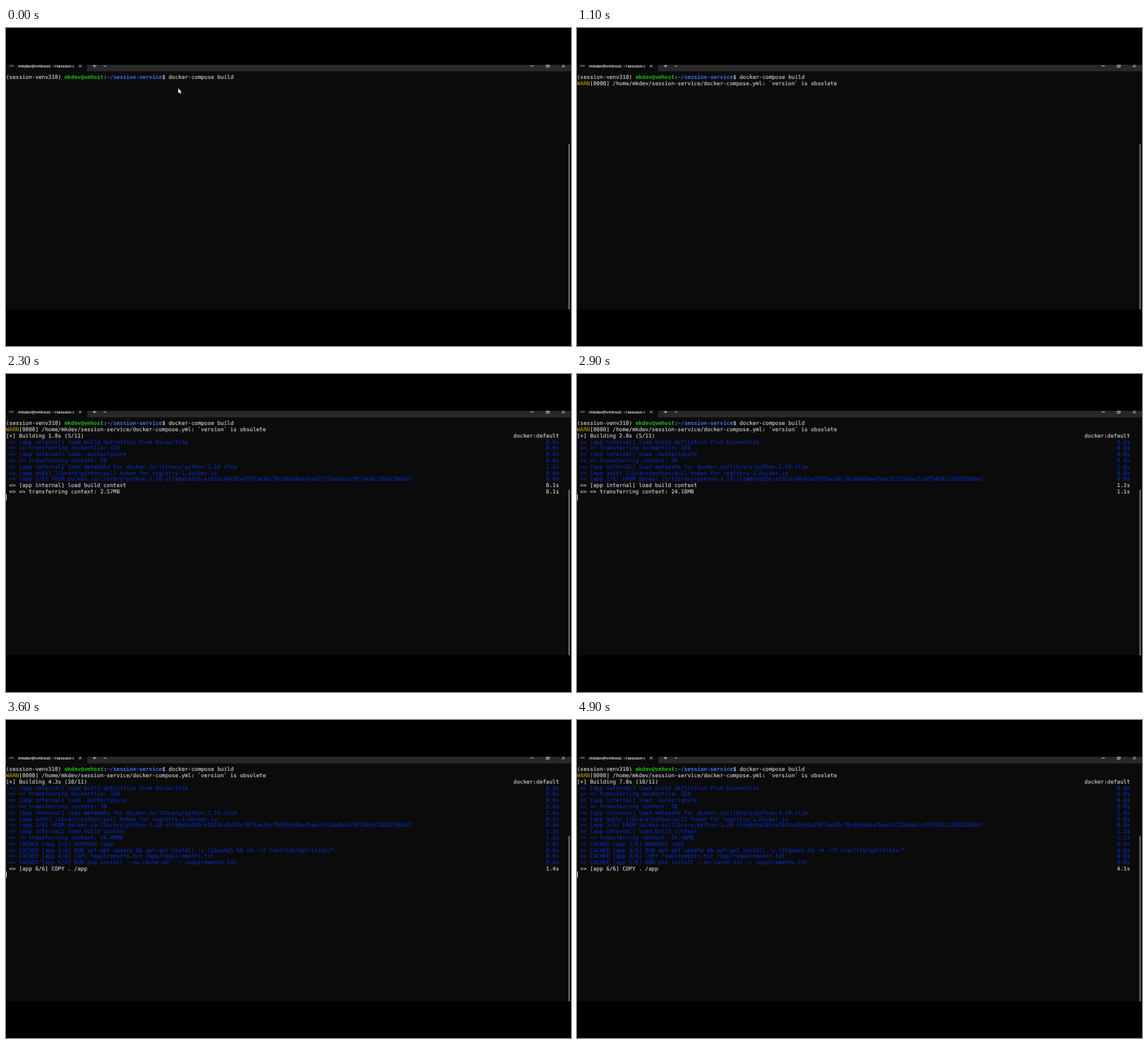
An HTML page that plays this animation: 800 px wide and 450 px high, repeating every 5000 ms.

```html
<!DOCTYPE html>
<html>
<head>
<meta charset="utf-8">
<style>
html, body { margin: 0; width: 100%; height: 100%; overflow: hidden; background: #000; }
svg { display: block; width: 800px; height: 450px; }
text { white-space: pre; text-rendering: geometricPrecision; }
#term text {
  font: 7.65px "DejaVu Sans Mono", monospace;
  stroke: currentColor; stroke-width: .12px; fill: currentColor;
}
#term .bold { font-weight: bold; stroke: none; }
.title { font: 600 5.9px "Open Sans", sans-serif; fill: #eee; }
.icons { fill: none; stroke: #ddd; stroke-width: .8; }
</style>
</head>
<body>
<svg viewBox="0 0 800 450">
  <defs>
    <clipPath id="bar"><rect y="52" width="800" height="9.5"/></clipPath>
    <clipPath id="tab"><rect y="51.5" width="96" height="10"/></clipPath>
  </defs>
  <rect y="52" width="800" height="346" fill="#0b0b0b"/>
  <rect x="115" y="52" width="685" height="9.3" fill="#282828"/>
  <g clip-path="url(#bar)">
    <rect x="4.5" y="50" width="6.5" height="5" fill="#444"/>
    <text class="title" x="17" y="56" clip-path="url(#tab)">mkdev@vmhost: ~/session-service</text>
    <path class="icons" d="M103 51.7l4 4m0-4l-4 4M122.8 53.7h5m-2.5-2.5v5M138.2 53l1.8 1.6 1.8-1.6
      M742.5 53.8h5M765 52.6h3.2v3h-3.2zM766.2 52.4v-.8h3v3h-.8M787 51.6l4.4 4.4m0-4.4l-4.4 4.4"/>
  </g>
  <rect x="796.6" y="164" width="1.5" height="234" fill="#8c8c8c"/>
  <g id="term"></g>
  <path id="mouse" fill="#fff" d="M244 85.3v7l1.6-1.4 1.1 2.3 1-.5-1-2.2h2z"/>
</svg>
<script>
const NS = "http://www.w3.org/2000/svg";
const term = document.getElementById("term"), mouse = document.getElementById("mouse");
const CELL = 4.6057, ROW = 8.79, TOP = 64.9, RIGHT = 783;
const WHITE = "#d2d2d2", BLUE = "#0a2dbb", GREEN = "#16bd0e", PATH = "#3b72ec", YELLOW = "#b59405";
const BASE = "docker.io/library/python:3.10-slim";
const HASH = "e1013c40c02a7875ae30c78c69b68ea7bee31713e8ac1c0f5469c1266258d6d7";
// loop time in ms, build clock in seconds
const CLOCK = [[1200, .1], [1400, .1], [1800, .7], [2300, 1.8], [2900, 2.8], [3600, 4.3], [4900, 7]];

function add(tag, attrs, content = "") {
  const el = document.createElementNS(NS, tag);
  for (const k in attrs) el.setAttribute(k, attrs[k]);
  el.textContent = content;
  term.append(el);
}

function put(row, col, str, color = WHITE, bold = false) {
  add("text", { x: col * CELL, y: TOP + 7.4 + row * ROW, color, class: bold ? "bold" : "" }, str);
}

function putRight(row, str, color = WHITE) {
  add("text", { x: RIGHT, y: TOP + 7.4 + row * ROW, color, "text-anchor": "end" }, str);
}

function caret(row, col = 0) {
  add("rect", { x: col * CELL, y: TOP + row * ROW, width: 1, height: ROW, fill: WHITE });
}

function clock(t) {
  let i = 1;
  while (i < CLOCK.length - 1 && t > CLOCK[i][0]) i++;
  const [t0, a] = CLOCK[i - 1], [t1, b] = CLOCK[i];
  return a + (b - a) * (t - t0) / (t1 - t0);
}

function build(t) {
  const total = clock(t), pulled = t >= 2300, copying = t >= 3000;
  const sent = Math.min(total - 1.7, 1.2);
  const count = copying ? "10/11" : pulled ? "5/11" : "3/4";
  let row = 3;
  const step = (str, secs = 0, done = true) => {
    const color = done ? BLUE : WHITE;
    put(row, 1, "=> " + str, color);
    putRight(row++, secs.toFixed(1) + "s", color);
  };

  put(2, 0, `[+] Building ${total.toFixed(1)}s (${count})`);
  putRight(2, "docker:default");
  step("[app internal] load build definition from Dockerfile");
  step("=> transferring dockerfile: 32B");
  step("[app internal] load .dockerignore");
  step("=> transferring context: 2B");
  step(`[app internal] load metadata for ${BASE}`, pulled ? 1.6 : total - .1, pulled);
  step("[app auth] library/python:pull token for registry-1.docker.io");
  if (pulled) {
    const size = copying ? 24.48 : 2.57 + 21.61 * (sent - .1);
    step(`[app 1/6] FROM ${BASE}@sha256:${HASH}`);
    step("[app internal] load build context", sent, copying);
    step(`=> transferring context: ${size.toFixed(2)}MB`, sent, copying);
  }
  if (copying) {
    step("CACHED [app 2/6] WORKDIR /app");
    step("CACHED [app 3/6] RUN apt-get update && apt-get install -y libgomp1 && rm -rf /var/lib/apt/lists/*");
    step("CACHED [app 4/6] COPY requirements.txt /app/requirements.txt");
    step("CACHED [app 5/6] RUN pip install --no-cache-dir -r requirements.txt");
    step("[app 6/6] COPY . /app", total - 2.9, false);
  }
  caret(row);
}

function draw(t) {
  term.replaceChildren();
  put(0, 0, "(session-venv310)");
  put(0, 18, "mkdev@vmhost", GREEN, true);
  put(0, 30, ":");
  put(0, 31, "~/session-service", PATH, true);
  put(0, 48, "$ docker-compose build");
  mouse.style.display = t < 800 ? "" : "none";
  if (t >= 200 && t < 500) caret(0, 70);
  if (t >= 900) {
    put(1, 0, "WARN", YELLOW);
    put(1, 4, "[0000] /home/mkdev/session-service/docker-compose.yml: `version` is obsolete");
  }
  if (t >= 1200) build(t);
}

let last = -1;
function frame() {
  const t = Math.floor(performance.now() % 5000 / 100) * 100;
  if (t !== last) draw(last = t);
  requestAnimationFrame(frame);
}
frame();
</script>
</body>
</html>
```
